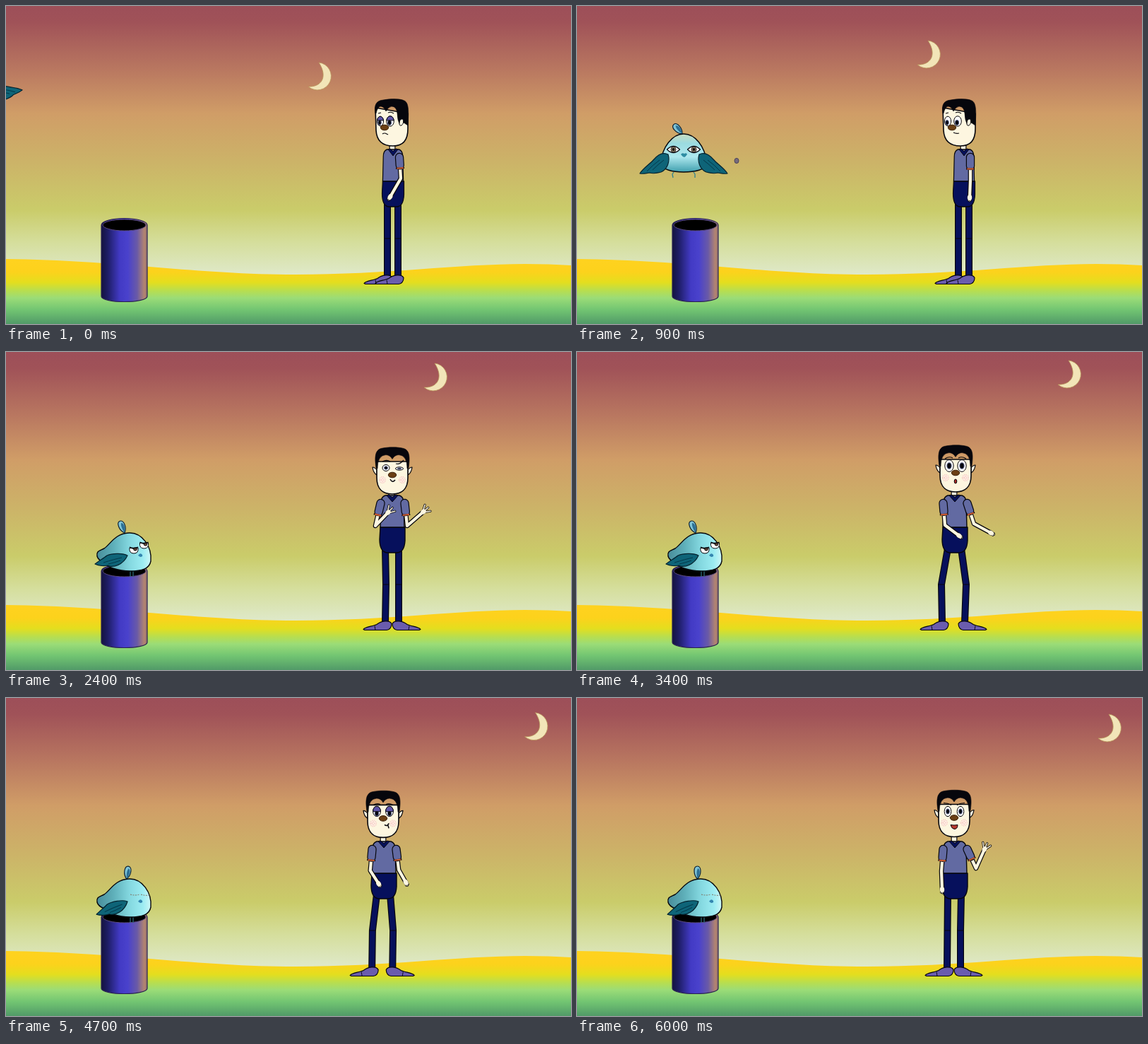
An HTML page with a canvas for the animation above (6100 ms loop, 800 px wide and 450 px high).

```html
<!DOCTYPE html>
<html>
<head>
<meta charset="utf-8">
<style>
html, body { margin: 0; width: 100%; height: 100%; overflow: hidden; }
canvas { display: block; }
</style>
</head>
<body>
<canvas id="stage" width="800" height="450"></canvas>
<script>
const ctx = document.getElementById('stage').getContext('2d');
const LOOP = 6100, STEP = 100;
const INK = '#06060c', SKIN = '#fdf6e0', NAVY = '#06105c', SHIRT = '#626aa2',
  SHOE = '#6a5cae', LID = '#5f55a8', TEAL = '#0e6478', CUFF = '#c85a30';

// Drawing helpers
function path(d, fill, stroke = INK, width = 1.4) {
  const p = new Path2D(d);
  if (fill) { ctx.fillStyle = fill; ctx.fill(p); }
  if (stroke) { ctx.strokeStyle = stroke; ctx.lineWidth = width; ctx.stroke(p); }
}
const line = (d, color = INK, width = 1.3) => path(d, null, color, width);
const oval = (x, y, rx, ry, fill, stroke = INK, width = 1.2) =>
  path(`M${x - rx} ${y}a${rx} ${ry} 0 1 1 ${2 * rx} 0a${rx} ${ry} 0 1 1 ${-2 * rx} 0Z`, fill, stroke, width);
function limb(points, width, fill, cap = 'round', edge = 2.4) {
  const d = 'M' + points.map(p => p.join(' ')).join('L');
  ctx.lineCap = cap;
  line(d, INK, width + edge);
  line(d, fill, width);
  ctx.lineCap = 'butt';
}
function at(x, y, draw, angle = 0, sx = 1, sy = 1) {
  ctx.save();
  ctx.translate(x, y);
  ctx.rotate(angle * Math.PI / 180);
  ctx.scale(sx, sy);
  draw();
  ctx.restore();
}
function gradient(x0, y0, x1, y1, stops) {
  const g = ctx.createLinearGradient(x0, y0, x1, y1);
  stops.forEach(([offset, color]) => g.addColorStop(offset, color));
  return g;
}
const mix = (a, b, k) => a.map((v, i) => v + (b[i] - v) * k);
const smooth = k => k * k * (3 - 2 * k);
function sample(keys, t, ease = smooth) {
  const next = keys.findIndex(k => k[0] > t);
  if (next === 0) return keys[0].slice(1);
  if (next < 0) return keys[keys.length - 1].slice(1);
  const a = keys[next - 1], b = keys[next];
  return mix(a, b, ease((t - a[0]) / (b[0] - a[0]))).slice(1);
}

// Scenery
const sky = gradient(0, 0, 0, 380, [[0, '#9d4f59'], [.06, '#a05258'], [.23, '#b87660'],
  [.4, '#d09d67'], [.58, '#ccb368'], [.76, '#cacc6a'], [.88, '#d5de9c'], [1, '#dfe9c9']]);
const ground = gradient(0, 358, 0, 450, [[0, '#ffd21f'], [.2, '#fcd21c'], [.36, '#e4de1e'],
  [.48, '#bade4c'], [.6, '#9bdc77'], [.78, '#72c572'], [1, '#519a68']]);
const metal = gradient(135, 0, 200, 0, [[0, '#14133f'], [.14, '#1e1d66'], [.4, '#423ac4'],
  [.58, '#4a42cc'], [.78, '#6a5aa6'], [.94, '#b5866f'], [1, '#8d6a70']]);

function scenery() {
  ctx.fillStyle = sky;
  ctx.fillRect(0, 0, 800, 450);
  path('M0 358C160 360 270 380 410 380C540 380 640 365 735 365Q770 365 800 367V450H0Z', ground, null);
}
function barrel() {
  path('M135 310A32.5 9.5 0 0 1 200 310V411A32.5 7.5 0 0 1 135 411Z', metal, '#2a2352', 1.2);
  oval(167.5, 310, 30.5, 8, '#000', '#5a4a80', 1);
}
const MOON = [[0, 428, 80], [700, 470, 55], [900, 482, 49], [1400, 517, 34], [2100, 568, 19],
  [2400, 592, 16], [2900, 636, 12], [3400, 681, 12], [4200, 726, 15], [4900, 738, 23]];
function moon(t) {
  const [x, y] = sample(MOON, t, k => k);
  at(x, y, () => path('M15 0A19.5 19.5 0 1 1 0 34C17 35 29 22 15 0Z', '#f2e5b8', '#b8945a', .8));
}

// Bird
const plumageFront = gradient(0, -29, 0, 25, [[0, '#c9dcc0'], [.25, '#9bdbe0'], [.6, '#aee8ee'], [1, '#3f9fae']]);
const plumageSide = gradient(130, 0, 205, 0, [[0, '#4a8f9c'], [.3, '#5fb0ba'], [.6, '#84d8e0'], [.85, '#9cecf2'], [1, '#cdf7f6']]);
const FLIGHT = [[0, -47, 116], [900, 151, 210], [1400, 167, 284]];
const CREST = [[4400, 168, -22], [5100, 175, 55], [6000, 170.5, 0]];

function crest(x, y, angle) {
  at(x, y, () => {
    path('M0 0C-6 -6 -6 -18 0 -18C6 -18 6 -6 0 0Z', '#7fc4d6', '#0b2034', 1.2);
    path('M0 0C-1 -5 -2 -12 1 -15C5 -12 3 -5 0 0Z', '#2c6f95', null);
  }, angle);
}
function birdFront(t) {
  const [x, y] = sample(FLIGHT, t, k => k);
  const flap = t < 1400 ? -16 - 16 * Math.cos(t * Math.PI * 2 / 600) : 12;
  at(x, y, () => {
    line('M-14 25l-2 3l1 5M14 25l2 3l0 5', '#2f8190');
    crest(-2, -29, -42);
    path('M-32 12C-31 -10 -16 -29 0 -29C16 -29 30 -12 33 12C33 22 14 25 0 25C-14 25 -32 22 -32 12Z', plumageFront);
    for (const side of [-1, 1]) {
      at(side * 24, 1, () => {
        path('M-2 -1C6 -5 13 0 18 6C24 13 33 18 38 26C31 27 28 25 24 25C18 27 13 25 8 24C-1 20 -5 9 -2 -1Z', TEAL, '#04222e', 1.2);
        line('M4 7Q12 13 20 21M10 7Q20 14 28 23', '#04384a', 1);
      }, side * flap, side);
      at(side * 14.5, -7, () => {
        path('M-9 0Q0 -9 9 0Q0 9 -9 0Z', '#fff', INK, 1.2);
        oval(0, 0, 3.6, 3.8, '#8d7b61', INK, .7);
        oval(0, 0, 1.7, 2, INK, null);
      });
    }
    path('M-4 0Q-2 -3 1 -1Q4 -3 5 0Q3 3 1 4Q-2 3 -4 0Z', '#2f8da3', null);
  });
}
function sideEye(x, y, mad) {
  at(x, y, () => {
    path(mad ? 'M-6 -3Q0 0 6 -3Q7 5 0 5Q-7 5 -6 -3Z' : 'M-6 -3L5 -4Q8 4 4 4L-4 5Q-6 3 -6 -3Z', '#fff', INK, 1);
    oval(2, -1, 2.4, 2.2, '#5d4334', INK, .8);
    line(mad ? 'M-6 -4Q-1 -1 6 -4' : 'M-7 -3L6 -4', INK, 1.3);
  });
}
function birdSide(t) {
  const asleep = t >= 4700;
  const [crestX, angle] = sample(CREST, t);
  line('M176 308v10M180 308v10', '#2f7180', 1.2);
  crest(crestX, 256, angle);
  path('M129 289C128 282 131 282 139 278C148 272 154 257 174 256C193 255 207 276 205 296C203 307 192 310 176 310C158 310 142 304 139 298C134 296 130 293 129 289Z', plumageSide);
  at(172, 288, () => {
    path('M0 0C-7 -4 -22 -3 -29 0C-34 4 -41 8 -46 12C-40 15 -32 15 -28 14C-20 18 -6 13 0 0Z', TEAL, '#04222e', 1.2);
    line('M-8 3Q-18 5 -34 10M-10 7Q-18 10 -27 12', '#04384a', 1);
  }, asleep ? -8 : 0);
  if (asleep) {
    ctx.setLineDash([2, 1.5]);
    line('M176 278Q183 280 189 278M191 278Q197 280 203 279', '#80715f', 1);
    ctx.setLineDash([]);
  } else {
    sideEye(181, 280, t < 3800);
    sideEye(195.5, t < 3800 ? 273 : 276, t < 3800);
  }
  path('M187 288Q190 283 193 287Q194 290 190 290Z', '#3486b0', null);
}
function pebble(t) {
  if (t < 800 || t > 1000) return;
  oval(226, 219 + (t - 900) * .04, 3, 3.6, '#776b7d', '#4b4358', 1);
}

// Man
function shoe(x, side) {
  at(x, 381.5, () => {
    path('M-31 11C-28 7 -18 7 -12 4C-6 -1 6 -3 9 3C9 8 6 12 2 12H-29Z', SHOE, INK, 1.2);
    line('M-15 6l1 6', INK, .9);
  }, 0, side);
}
function leg(hip, knee, foot) {
  limb([[hip, 278], [knee, 329], [foot, 383]], 7.6, NAVY, 'butt');
  line(`M${knee - 4} 329h8`, INK, 1);
}
function torso(x, width) {
  at(x, 203, () => {
    path('M-17 45H18V64Q17 81 6 81H-8Q-18 79 -18 62Z', NAVY);
    path('M-10 0H10Q16 2 16 10L17 45H-17L-16 10Q-16 2 -10 0Z', SHIRT);
    path('M-8 0L0 9L8 0L5 -1L0 3L-5 -1Z', NAVY, INK, 1);
  }, 0, width);
}
function arm(shoulder, elbow, hand, open) {
  const angle = Math.atan2(hand[1] - elbow[1], hand[0] - elbow[0]) * 180 / Math.PI;
  const [length, spread] = open ? [9, 6] : [5, 1.5];
  limb([shoulder, elbow, hand], 4.2, SKIN);
  at(...hand, () => {
    for (const k of [-1, 0, 1]) limb([[0, k], [length - Math.abs(k), k * spread]], 1.5, SKIN, 'round', 1.6);
    oval(0, 0, 4, 3.2, SKIN, null);
  }, angle);
  limb([shoulder, mix(shoulder, elbow, .38)], 10, SHIRT);
  limb([mix(shoulder, elbow, .48), mix(shoulder, elbow, .55)], 9.5, CUFF, 'butt');
}
function eye(x, y, rx, ry, { lid = 0, lookX = 0, lookY = 0 } = {}) {
  oval(x, y, rx, ry, '#fff', INK, 1);
  oval(x + lookX, y + lookY, rx * .5, ry * .5, INK, '#5c6690', 1);
  if (!lid) return;
  ctx.save();
  ctx.beginPath();
  ctx.rect(x - rx - 1, y - ry - 1, rx * 2 + 2, ry * lid * 2 + 1);
  ctx.clip();
  oval(x, y, rx, ry, LID, INK, 1);
  ctx.restore();
  line(`M${x - rx} ${y - ry + ry * lid * 2}h${2 * rx}`, INK, 1);
}
function pair(gap, y, rx, ry, options) {
  eye(-gap, y, rx, ry, options);
  eye(gap, y, rx, ry, options);
}
const nose = (x, y) => oval(x, y, 5.7, 3.8, '#6b3f14', '#3a200a', 1);

const faces = {
  smirk() {
    eye(-9, 29, 5, 4.5);
    eye(10, 30, 5.5, 2.2);
    line('M-14 20Q-8 17 -3 20M5 23Q10 25 16 18');
    line('M-3 45Q0 51 4 46', INK, 1.5);
  },
  surprised() {
    pair(9, 29, 6.2, 8.4);
    line('M-15 19Q-9 15 -4 18M4 18Q9 15 15 19', INK, 1.1);
    oval(0, 51, 1.8, 3, '#a82a26', INK, 1);
  },
  smile() {
    pair(9, 30, 5.3, 7.6);
    line('M-14 20Q-9 16 -4 19M4 19Q9 16 14 20', INK, 1.1);
    path('M-4 50Q0 52 5 49Q5 55 0 55Q-4 54 -4 50Z', '#fff', INK, 1);
  },
  sleepy() {
    pair(9, 29, 5.4, 7.2, { lid: .52, lookY: 3 });
    line('M-14 20Q-9 17 -4 19M4 19Q9 17 14 20', INK, 1.1);
    line('M2 48Q6 51 8 46M7 49l1 4', INK, 1.6);
  },
  glad() {
    pair(9, 30, 4.8, 7.2);
    line('M-15 18Q-9 18 -4 21M4 21Q9 18 15 18', INK, 1.1);
    path('M-5 49Q0 50 5 49Q5 55 0 55Q-4 54 -5 49Z', '#b8392e', INK, 1);
  }
};
function frontHead(x, y, face) {
  at(x, y, () => {
    for (const side of [-1, 1]) at(side * 22, 34, () => path('M0 5Q5 2 6 -6Q3 -6 0 -2Z', SKIN, INK, 1.2), 0, side);
    path('M-22 20V43C-22 60 -12 66 0 66C12 66 22 60 22 43V20Z', SKIN, INK, 1.6);
    path('M-23 29C-25 15 -25 4 -16 1.5C-6 -.8 8 -.8 16 1.5C25 4 25 15 23 29L21 30Q21 11 9 10.500Q3 11 0 16.500Q-3 11 -9 10.500Q-21 11 -21 30Z', INK, INK, .6);
    ctx.setLineDash([1, 1.6]);
    for (const side of [-1, 1]) {
      oval(side * 14, 46, 4.5, 4.5, '#fdebe0', '#f0a5a5', .9);
      oval(side * 14, 46, 2, 2, null, '#f0a5a5', .9);
    }
    ctx.setLineDash([]);
    faces[face]();
    nose(0, 39);
  });
}
function sideHead(x, sleepy) {
  at(x, 132, () => {
    path('M-23 12L-22 44C-21 62 -10 66 2 66C16 66 23 58 23 42V20Z', SKIN, INK, 1.6);
    path('M-23 20C-25 8 -22 2 -12 1C0 -1 12 -1 18 2C25 5 24 20 23 37L17 33L12 37Q8 29 8 20Q7 10 0 10Q-5 11 -8 17Q-11 10 -16 10Q-20 11 -22 20Z', INK, INK, .6);
    path('M11 34Q11 27 16 28Q18 34 14 37Q11 38 11 34Z', SKIN, INK, 1);
    const look = sleepy ? { lid: .42, lookX: -1, lookY: 2 } : { lookX: -1, lookY: 2 };
    eye(-16, 31, 4.6, 6.8, look);
    eye(-2, 31, 5.3, 7.2, look);
    line('M-19 20l4 -1M-5 19q4 -2 8 1', INK, 1.1);
    nose(-10, 40);
    line(sleepy ? 'M-13 49q3 -2 6 0l2 1' : 'M-8 47q4 2 8 1', INK, 1.2);
  });
}
function sideMan(t) {
  const [headX, elbowX, elbowY, handX, handY] =
    sample([[0, 546, 559, 244, 544, 270], [900, 541, 557, 246, 556, 271]], t);
  leg(540, 540, 540);
  leg(555, 555, 555);
  shoe(538, 1);
  shoe(554, 1);
  limb([[547, 194], [547, 207]], 6.5, SKIN, 'butt');
  torso(548, .86);
  arm([557, 214], [elbowX, elbowY], [handX, handY]);
  sideHead(headX, t < 500);
}

// time, head x y, body x, left elbow, left hand, right elbow, right hand, left knee foot, right knee foot
const POSES = [
  [1600, 547, 134, 547, 528, 245, 530, 271, 567, 245, 566, 271, 538, 538, 556, 556],
  [2400, 547, 135, 547, 523, 246, 541, 227, 568, 246, 591, 226, 538, 537, 556, 556],
  [3400, 536, 132, 535, 521, 245, 541, 260, 562, 243, 586, 256, 516, 517, 551, 549],
  [4200, 534, 132, 535, 514, 243, 541, 251, 555, 241, 583, 248, 516, 517, 551, 549],
  [5100, 534, 131, 535, 517, 245, 518, 271, 557, 245, 554, 270, 521, 519, 546, 546],
  [5700, 534, 130.5, 535, 516, 245, 517, 271, 565, 241, 577, 214, 524.5, 524, 543, 543]
];
const MOODS = [[2900, 'smirk'], [3800, 'surprised'], [4700, 'smile'], [5400, 'sleepy'], [LOOP, 'glad']];

function frontMan(t) {
  const [hx, hy, bx, lex, ley, lhx, lhy, rex, rey, rhx, rhy, lk, lf, rk, rf] = sample(POSES, t);
  const mood = MOODS.find(m => t < m[0])[1];
  const wave = t > 5700 ? 4 * Math.sin((t - 5700) / 300 * Math.PI) : 0;
  leg(bx - 10, lk, lf);
  leg(bx + 9, rk, rf);
  shoe(lf, 1);
  shoe(rf, -1);
  limb([[bx - 1, 194], [bx - 1, 207]], 6.5, SKIN, 'butt');
  torso(bx, 1);
  arm([bx - 16.5, 214], [lex, ley], [lhx, lhy], mood === 'smirk');
  arm([bx + 17.5, 214], [rex, rey], [rhx + wave, rhy], mood === 'smirk' || mood === 'glad');
  frontHead(hx, hy, mood);
}

function render() {
  const t = Math.floor(performance.now() / STEP) * STEP % LOOP;
  scenery();
  moon(t);
  barrel();
  pebble(t);
  (t < 1700 ? birdFront : birdSide)(t);
  (t < 1600 ? sideMan : frontMan)(t);
  requestAnimationFrame(render);
}
ctx.lineJoin = 'round';
render();
</script>
</body>
</html>
```
